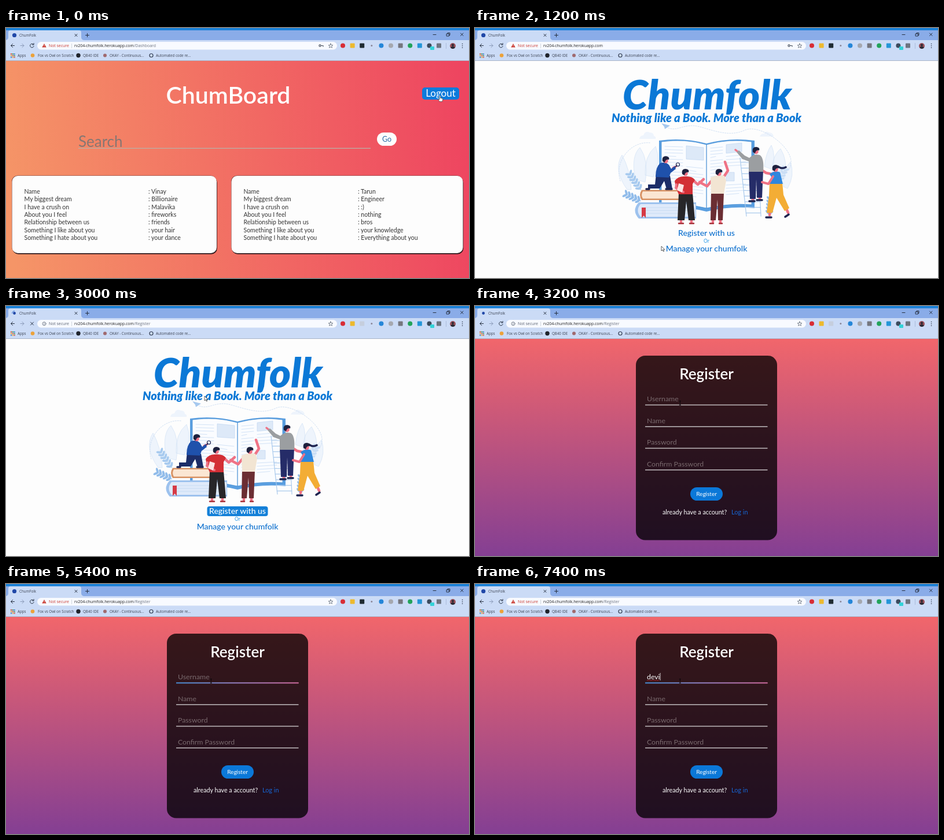
These frames come from a looping animation (800 by 433 pixels, 8000 ms). An HTML page:

```html
<!DOCTYPE html>
<html lang="en">
<head>
<meta charset="utf-8">
<title>ChumFolk</title>
<style>
html, body { margin: 0; width: 100%; height: 100%; overflow: hidden; background: #fdfdfd; }
svg { display: block; width: 100vw; height: 100vh; }
text { font-family: Lato, sans-serif; white-space: pre; }
.ui text { font-family: "Open Sans", sans-serif; font-size: 6.2px; fill: #3b4252; }
.ui .url { font-size: 6.9px; fill: #222; }
.mid { text-anchor: middle; }
.line { fill: none; stroke-linecap: round; stroke-linejoin: round; }
</style>
</head>
<body>
<svg viewBox="0 0 800 433" preserveAspectRatio="none">
<defs>
  <linearGradient id="warm" gradientUnits="userSpaceOnUse" x1="0" y1="290" x2="800" y2="200">
    <stop stop-color="#f59567"/><stop offset="1" stop-color="#ee4560"/>
  </linearGradient>
  <linearGradient id="dusk" x2="0" y2="1"><stop stop-color="#f1666b"/><stop offset="1" stop-color="#843f93"/></linearGradient>
  <linearGradient id="focusInk"><stop stop-color="#2f86dc"/><stop offset=".45" stop-color="#8a78c8"/><stop offset="1" stop-color="#d65d9c"/></linearGradient>
</defs>

<g id="dashboard">
  <rect y="57" width="800" height="376" fill="url(#warm)"/>
  <text class="mid" x="384" y="131" font-size="41" font-weight="600" fill="#fff">ChumBoard</text>
  <rect x="719" y="103" width="64" height="21" rx="5" fill="#0b7bdc"/>
  <text class="mid" x="751" y="119" font-size="17" fill="#fff">Logout</text>
  <text x="125" y="206" font-size="26" fill="#757575" opacity=".85">Search</text>
  <path d="M125 208.3H630" stroke="#b9b0a6" stroke-width="1.3"/>
  <rect x="641" y="181" width="34" height="23" rx="11.5" fill="#fdfdfd"/>
  <text class="mid" x="658" y="197" font-size="12.5" fill="#2d6da8">Go</text>
  <g id="cards" font-size="10.5" fill="#333"></g>
</g>

<g id="home">
  <rect y="57" width="800" height="376" fill="#fdfdfd"/>
  <g class="mid" fill="#0b78d6" font-style="italic" font-weight="900">
    <text x="401" y="141" font-size="70.5">Chumfolk</text>
    <text x="400" y="163" font-size="20">Nothing like a Book. More than a Book</text>
  </g>
  <g id="picture">
    <g fill="#eef4fc">
      <path d="M284 192q1-6 7-6 3-9 11-5 7 0 7 6 4 1 3 5zM492 188q2-5 7-5 4-6 9-2 7 0 8 7z"/>
      <path d="M263 280Q238 245 254 220 268 245 270 280zM277 262Q269 222 285 207 301 230 294 267zM294 255Q292 222 312 205 322 230 308 258zM515 262Q509 226 528 209 541 230 535 260zM500 240Q503 215 512 203 520 220 514 245zM533 275Q531 245 545 232 553 255 540 278z" stroke="#d3e2f5" stroke-width=".7"/>
    </g>
    <path class="line" d="M334 173C350 180 362 164 388 171S440 189 466 177 548 205 546 233 520 240 525 252M251 265C240 230 270 195 303 199" stroke="#c3d7f0" stroke-width=".8" stroke-dasharray="2 2"/>
    <path d="M322 165l15 4-9 6-1-4z" fill="#a6c8ee"/>
    <path d="M318 195Q360 189 400 200 440 189 483 195V312Q440 308 400 318 360 308 318 312z" fill="#5b9fe0"/>
    <path d="M322 197Q362 191 400 202V312Q362 303 322 306zM478 197Q440 191 400 202V312Q440 303 478 306z" fill="#fafcff" stroke="#3b88d0" stroke-width=".7"/>
    <path d="M365 204l30 3v22l-30-2zM434 202l27-3v15l-27 3zM434 250h14v15h-14z" fill="#dde9f8" stroke="#b9d2ef" stroke-width=".6"/>
    <path id="print" class="line" stroke="#d3e3f6" stroke-width="1.1"/>
    <path id="ladder" class="line" stroke="#a9c9ec" stroke-width="1.2"/>
    <g id="sprigs"></g>

    <path d="M288 280.5H358V298H288q-6-8.500 0-17.500z" fill="#d79163"/>
    <path d="M290 283H357V295.500H290q-4-6 0-12.500z" fill="#fbe6d3"/>
    <path d="M283 302H382V330H283q-13-14 0-28z" fill="#9dc2ee"/>
    <path d="M286 305H381V327H286q-9-11 0-22z" fill="#dfeafa"/>
    <path d="M294 311H375M294 316H375M294 321H375" stroke="#bfd6f2" stroke-width=".8"/>
    <path d="M288 311h7v18l-3.5-4-3.5 4z" fill="#d63a45"/>

    <g class="line" stroke="#ef7386" stroke-width="4.5">
      <path d="M342 242l5-2" stroke-width="3.5"/>
      <path d="M375 262L385 271 395 262M356 330V336M374 330V336"/>
      <path d="M429 259L437 247 432 232M411 262L401 274 388 267M411 330V336M424 330V336"/>
      <path d="M455 215l-5-4" stroke-width="3.5"/>
      <path d="M480 290V298M492 290V296M513 253L503 251 495 246M510 316L509 324M538 313L541 320"/>
    </g>
    <path d="M313 253L337 256 341 279H331L327 265 319 278H299V271H311z" fill="#1c2d68"/>
    <path d="M312 258Q312 241 320 234 329 231 335 237L339 244 345 239 347 244 338 251 335 259z" fill="#1f51ab"/>
    <path d="M352 286H376L380 333H369L365 300 362 333H350z" fill="#272629"/>
    <path d="M345 265Q351 256 363 257 375 256 380 263L376 270 376 288H352L347 277z" fill="#d32f35"/>
    <path d="M408 285H430L428 333H420L419 297 416 333H407z" fill="#6b2e33"/>
    <path d="M407 259Q420 253 431 256L434 264 430 287H408z" fill="#f2e5d3"/>
    <path d="M473 246H498L496 294H487L486 262 485 296H475z" fill="#252c68"/>
    <path d="M474 225Q482 217 492 220 500 225 498 249H473V231L462 227 452 215 456 212 466 221z" fill="#9b9ea1"/>
    <path d="M509 268H531L533 289 543 312 535 317 521 294 514 320H504L508 291z" fill="#f3ad35"/>
    <path d="M509 253Q518 246 527 250L532 270H508L512 258z" fill="#2e86dd"/>
    <path class="line" d="M515 257L507 270 496 267M348 271L347 277 360 284" stroke="#ef7386" stroke-width="4"/>
    <path d="M352 269l9 3-3 13-9-4z" fill="#fbe3e3"/>
    <g class="line" stroke="#1e2450" stroke-width="3.500">
      <path d="M330 279h10M296 279h5M474 300h9M487 298h9M503 328h9M536 327l6-4M524 240Q530 245 537 241"/>
      <path d="M352 338.500h8M371 338.500h7M406 338.500h6M422 338.500h5" stroke="#a72d35" stroke-width="2.500"/>
      <path d="M346 241l3-3" stroke-width="1.300"/>
      <circle cx="350.500" cy="236.500" r="3" stroke-width="1.200"/>
    </g>
    <g id="heads"></g>
  </g>
  <g class="mid" font-size="14" fill="#0b6fce" font-weight="500">
    <rect id="registerHover" x="347.5" y="347" width="105" height="17" rx="4" fill="#1480d8"/>
    <text id="registerLink" x="400" y="360">Register with us</text>
    <text x="400" y="372" font-size="8.5" font-weight="400" fill="#2b9bea">Or</text>
    <rect id="manageHover" x="323" y="374" width="155" height="17" rx="4" fill="#1480d8"/>
    <text id="manageLink" x="400" y="387">Manage your chumfolk</text>
  </g>
</g>

<g id="register">
  <rect y="57" width="800" height="376" fill="url(#dusk)"/>
  <rect x="278" y="86" width="244" height="319.5" rx="16" fill="#000" fill-opacity=".77"/>
  <text class="mid" x="400" y="127" font-size="26" font-weight="600" fill="#fff">Register</text>
  <g id="fields" font-size="12.3"></g>
  <rect id="focusLine" x="294" y="170.6" width="211.5" height="1.6" fill="url(#focusInk)"/>
  <text id="typed" x="297" y="165" font-size="12.3" fill="#fff"></text>
  <path id="caret" stroke="#fff" stroke-width=".8"/>
  <path id="squiggle" d="M297 167.5l1.5-1 1.5 1 1.5-1 1.5 1 1.5-1 1.5 1 1.5-1 1.5 1 1.5-1 1.5 1 1.5-1 1.5 1 1.5-1 1.5 1" fill="none" stroke="#d02c2c" stroke-width=".8"/>
  <rect x="372" y="314" width="56" height="23" rx="11.5" fill="#0b78d8"/>
  <text class="mid" x="400" y="329" font-size="10" fill="#fff">Register</text>
  <text x="324" y="361" font-size="10.7" fill="#fff">already have a account?</text>
  <text x="443" y="361" font-size="10.9" fill="#1765d2">Log in</text>
</g>

<g class="ui">
  <rect width="800" height="57" fill="#cbdbf6"/>
  <rect width="800" height="21" fill="#8aace8"/>
  <rect width="800" height="4" fill="#1d82d8"/>
  <path d="M0 21Q4 20 4 16V8q0-4 4-4H126q4 0 4 4v8q0 4 4 5z" fill="#cbdbf6"/>
  <path d="M0 56.5H800" stroke="#a8b4c8"/>
  <circle id="favicon" cx="14.5" cy="12.5" fill="#2148a8"/>
  <path id="spinner" d="M14.5 8.5a4 4 0 0 1 4 4" class="line" stroke="#3778dc" stroke-width="1"/>
  <text x="23" y="15">ChumFolk</text>
  <g class="line" stroke="#273142" stroke-width="1">
    <path d="M119 10.5l4 4m0-4l-4 4M137.5 12.5h6m-3-3v6M738 11.5h5M761.5 10h4v4h-4zM763 10V8.5h4V12.5h-1.5M785.5 9l4.5 4.5m0-4.5l-4.5 4.5"/>
    <path d="M14.5 30.5H8.5m3-3l-3 3 3 3"/>
    <path d="M25 30.5h6m-3-3l3 3-3 3" stroke="#8a9ab8"/>
    <path id="reload" d="M47.5 28.5a3.3 3.3 0 1 0 .6 3M48 26.5v2.5h-2.5"/>
    <path id="stop" d="M42.5 28l5 5m0-5l-5 5"/>
  </g>
  <rect x="54" y="24" width="518" height="13.5" rx="6.7" fill="#f8faff"/>
  <g id="warning"><path d="M66 27l3.7 6.5h-7.4z" fill="#c8372d"/><path d="M66 29.2v2m0 .8v.6" stroke="#fff" stroke-width=".8"/></g>
  <g id="info" class="line" stroke="#596270" stroke-width=".8"><circle cx="66" cy="30.7" r="3"/><path d="M66 30.3v1.8m0-3.2v.1"/></g>
  <text id="security" class="url" x="74" y="33">Not secure</text>
  <path d="M113.5 27v8" stroke="#c2c7d0" stroke-width=".7"/>
  <text class="url" x="118" y="33">rv204-chumfolk.herokuapp.com<tspan id="route" fill="#6d7480"></tspan></text>
  <g id="key" class="line" stroke="#4e5765" stroke-width="1.2"><circle cx="542.5" cy="30.5" r="1.6"/><path d="M544.5 30.5h3.5v1.5"/></g>
  <path d="M561 27l1 2.5 2.8.2-2.1 1.8.7 2.7-2.4-1.5-2.4 1.5.7-2.7-2.1-1.8 2.8-.2z" class="line" stroke="#596270" stroke-width=".8"/>
  <g id="extensions"></g>
  <path d="M760.5 26v10" stroke="#9eafd0" stroke-width=".7"/>
  <circle cx="772" cy="31" r="5" fill="#99515a"/><path d="M768 34q4-5 8 0-4 4-8 0z" fill="#282a35"/><circle cx="772" cy="29.5" r="2" fill="#282a35"/>
  <path d="M788.5 27.5h.1m-.1 3.2h.1m-.1 3.2h.1" class="line" stroke="#273142" stroke-width="1.5"/>
  <g id="bookmarks"></g>
</g>

<path id="arrow" d="M0 0v8l2-1.8 1.5 3 1.2-.6-1.4-2.8H6z" fill="#fff" stroke="#222" stroke-width=".7"/>
<path id="hand" d="M0 0q1-1 1.6 0v3.2l4 .9q.7 3-1 5.4H.2L-2 6q-.3-1.5 1-1L0 6z" fill="#fff" stroke="#222" stroke-width=".6"/>
<path id="beam" d="M352.8 164.5h3m-1.5 0v7m-1.5 0h3" fill="none" stroke="#090609" stroke-width=".9"/>
</svg>

<script>
const $ = id => document.getElementById(id);
const show = (id, on) => { $(id).style.display = on ? '' : 'none'; };
const label = (x, y, s, extra = '') => `<text x="${x}" y="${y}" ${extra}>${s}</text>`;
const dot = (x, y, r, fill) => `<circle cx="${x}" cy="${y}" r="${r}" fill="${fill}"/>`;

const questions = ['Name', 'My biggest dream', 'I have a crush on', 'About you I feel',
  'Relationship between us', 'Something I like about you', 'Something I hate about you'];
function card(x, width, answerX, answers) {
  const box = (dx, dy, fill) => `<rect x="${x + dx}" y="${256 + dy}" width="${width}" height="134" rx="10" fill="${fill}"/>`;
  return box(.8, 1.8, '#2d1a1e') + box(-.5, -.5, '#6b3a38') + box(0, 0, '#fdfdfd') +
    questions.map((q, i) => label(x + 21, 287 + i * 13.3, q) + label(answerX, 287 + i * 13.3, ': ' + answers[i])).join('');
}
$('cards').innerHTML =
  card(10.5, 353.5, 246, ['Vinay', 'Billionaire', 'Malavika', 'fireworks', 'friends', 'your hair', 'your dance']) +
  card(389.5, 400, 608, ['Tarun', 'Engineer', ':)', 'nothing', 'bros', 'your knowledge', 'Everything about you']);

$('fields').innerHTML = ['Username', 'Name', 'Password', 'Confirm Password'].map((name, i) => {
  const y = 165 + i * 37.5;
  return label(297, y, name, `fill="#79696d" ${i ? '' : 'id="placeholder"'}`) +
    `<rect x="294" y="${y + 5.6}" width="211.5" height="1.6" fill="#b9b2b5"/>`;
}).join('');

let print = '';
for (let i = 0; i < 16; i++) {
  const y = 205 + i * 5.5, short = i % 4 === 3 ? 12 : 0;
  print += `M328 ${y}l${31 - short} 1`;
  if (i > 5) print += `M365 ${y + 2}l${29 - short} 3`;
  print += `M407 ${y + 3}l${21 - short} -2`;
  if (i > 2 && (i < 7 || i > 11)) print += `M434 ${y + 1}l${34 - short} -2`;
}
$('print').setAttribute('d', print);

let ladder = 'M458 225L469 326M489 225L494 326';
for (let i = 0; i < 10; i++) ladder += `M${459 + i} ${233 + i * 9.7}H${489.5 + i * .5}`;
$('ladder').setAttribute('d', ladder);

function sprig(x, y, angle, pairs, color) {
  let s = `<path d="M0 0H${pairs * 6}" stroke="${color}"/>`;
  for (let i = 1; i <= pairs; i++) for (const side of [-1, 1])
    s += `<ellipse cx="4" rx="4.6" ry="2" fill="${color}" transform="translate(${i * 6 - 3}) rotate(${side * 48})"/>`;
  return `<g transform="translate(${x} ${y}) rotate(${angle})">${s}</g>`;
}
$('sprigs').innerHTML = sprig(287, 300, 205, 5, '#91bcea') + sprig(287, 281, 235, 6, '#a7caef') +
  sprig(508, 325, -85, 5, '#91bcea') + sprig(518, 275, -60, 6, '#cadef5');

$('heads').innerHTML = [[329, 228], [363, 250], [421, 250], [485, 212], [519, 243]].map(([x, y]) =>
  dot(x + .5, y + 2, 4.3, '#ef7386') + `<path d="M${x - 5} ${y + 3}q-2-9 6-9 7 1 5 6-6-1-7 5z" fill="#1d213e"/>`).join('');

const extColors = ['#d82d35', '#edb92e', '#1f2b32', '#8b8798', '#2586d8', '#a5a8af', '#75767e', '#22a35a', '#2496d8', '#3c4b5d', '#6c7480'];
$('extensions').innerHTML = extColors.map((c, i) => {
  const x = 582 + i * 16.6;
  return [1, 2, 6, 8, 10].includes(i)
    ? `<rect x="${x - 4}" y="26.5" width="8" height="8" rx="1" fill="${c}" ${i === 2 ? 'id="helper"' : ''}/>`
    : dot(x, 30.5, i === 3 ? 1.5 : 4, c);
}).join('') + '<rect x="733" y="32" width="7" height="6" rx="1" fill="#32d2d8"/>';

const appColors = ['#d94a3d', '#3c9a56', '#3978d8', '#e4aa25'];
let marks = '';
for (let i = 0; i < 9; i++) marks += `<rect x="${8 + i % 3 * 2.8}" y="${44 + (i / 3 | 0) * 2.8}" width="2" height="2" fill="${appColors[i % 4]}"/>`;
marks += dot(46, 47.5, 3.3, '#eca23a') + dot(125, 47.5, 3.7, '#20242c') + dot(171, 47.5, 3, '#a06a70') +
  '<circle cx="251" cy="47.5" r="3" fill="none" stroke="#333d50" stroke-width="1.2"/>';
[[20, 'Apps'], [55, 'Fox vs Owl on Scratch'], [133, 'QB40 IDE'], [179, 'OKAY - Continuous...'], [259, 'Automated code re...']]
  .forEach(([x, s]) => marks += label(x, 50, s));
$('bookmarks').innerHTML = marks;

// Pointer keys: time, x, y
const pointer = [[0, 749, 118], [600, 748, 118], [1000, 222, 385], [1200, 322, 378], [1600, 360, 381],
  [1800, 386, 358], [2000, 387, 355], [2400, 387, 355], [3000, 343, 156], [3200, 354, 166]];
function pointerAt(t) {
  const n = pointer.findIndex(k => k[0] > t);
  if (n < 0) return pointer.at(-1).slice(1);
  const [a, b] = [pointer[n - 1], pointer[n]], u = (t - a[0]) / (b[0] - a[0]);
  return [1, 2].map(i => a[i] + (b[i] - a[i]) * u);
}

function draw(now) {
  const t = Math.floor(now % 8000 / 200) * 200;
  const between = (a, b) => t >= a && t < b;
  const loading = between(2400, 3200), settling = between(2400, 3600);
  const onManage = between(1400, 1800), onRegister = between(1800, 3200);
  const warned = t < 2400 || t >= 5000;

  show('dashboard', t < 200);
  show('home', between(200, 3200));
  show('register', t >= 3200);
  show('picture', t >= 800);
  show('manageHover', onManage);
  show('registerHover', onRegister);
  $('manageLink').setAttribute('fill', onManage ? '#fff' : '#0b6fce');
  $('registerLink').setAttribute('fill', onRegister ? '#fff' : '#0b6fce');

  show('stop', loading);
  show('reload', !loading);
  show('spinner', loading);
  $('spinner').setAttribute('transform', `rotate(${t * .45} 14.5 12.5)`);
  $('favicon').setAttribute('r', settling ? 2.4 : 3.6);
  $('helper').setAttribute('fill', settling ? '#c5cedd' : '#1f2b32');
  show('warning', warned);
  show('info', !warned);
  show('key', t < 2400);
  $('security').style.fill = warned ? '#c8372d' : '#596270';
  $('route').textContent = t < 200 ? '/Dashboard' : t >= 2400 ? '/Register' : '';

  const typed = 'devi'.slice(0, [5800, 6000, 6800, 7000].filter(k => t >= k).length);
  $('typed').textContent = typed;
  show('placeholder', !typed);
  show('focusLine', t >= 5000);
  show('caret', typed && !between(6400, 6800));
  if (typed) $('caret').setAttribute('d', `M${297.5 + $('typed').getComputedTextLength()} 154v13`);
  show('squiggle', t >= 7400);

  const hand = t < 200 || onManage || between(1800, 2600);
  const place = `translate(${pointerAt(t).join(' ')})`;
  for (const id of ['hand', 'arrow']) $(id).setAttribute('transform', place);
  show('hand', hand);
  show('arrow', !hand && t < 3200);
  show('beam', t >= 3200);
}

const start = performance.now();
function tick() {
  draw(performance.now() - start);
  requestAnimationFrame(tick);
}
draw(0);
tick();
</script>
</body>
</html>
```
